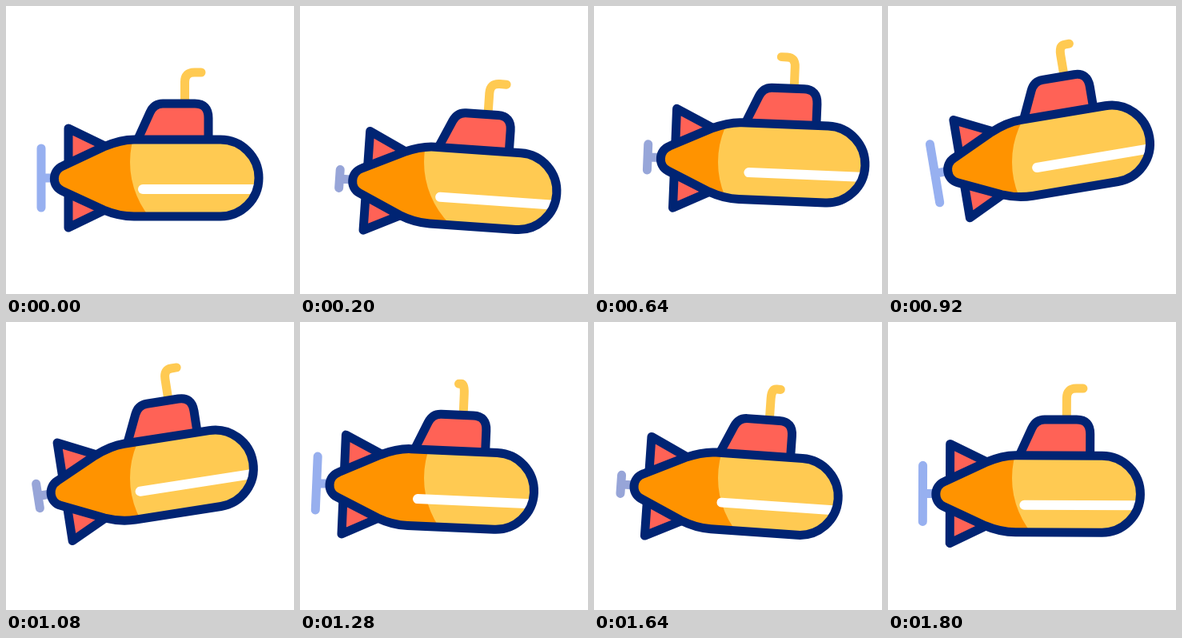
An HTML page with a canvas that plays this animation: 360 by 360 pixels, repeating every 1.84 s.

```html
<!DOCTYPE html>
<html lang="en">
<head>
<meta charset="utf-8">
<title>Submarine</title>
<style>
html, body { margin: 0; width: 100%; height: 100%; overflow: hidden; background: #fff; }
canvas { display: block; width: 360px; height: 360px; }
</style>
</head>
<body>
<canvas id="stage" width="360" height="360"></canvas>
<script>
const LOOP = 1840, SPIN = LOOP / 2;
const NAVY = '#002473', RED = '#ff6256', YELLOW = '#ffca52', ORANGE = '#ff9300';
const ctx = document.getElementById('stage').getContext('2d');

// Turning points as [ms, value]; the motion eases in and out between them
const driftX = [[0, 0], [660, 23], [740, 23], [1340, -24.7], [1400, -24.7], [LOOP, 0]];
const driftY = [[0, 0], [350, 18], [760, -30], [890, -30], [1300, -7], [LOOP, 0]];
const tilt = [[0, 0], [420, 8.5], [1000, -10.5], [1440, 8], [LOOP, 0]];
const scopeTurn = [[0, 1], [280, 1], [600, -0.85], [750, -0.85], [990, 1],
  [1430, -0.85], [1740, 1], [LOOP, 1]];

function ease(keys, t) {
  const i = keys.findIndex(key => key[0] > t);
  const [t0, v0] = keys[i - 1], [t1, v1] = keys[i];
  const u = (t - t0) / (t1 - t0);
  return v0 + (v1 - v0) * u * u * (3 - 2 * u);
}

const hull = new Path2D('M268 167H160C146 167 134 171 122 176L71 200C57 206 57 225 70 231' +
  'L122 255C134 260 146 263 160 263H268A48 48 0 0 0 268 167Z');
const fins = new Path2D('M78 153L140 183V247L78 277Z');
const tower = new Path2D('M165 166L180 133Q185 122 196 122H236Q253 122 253 140V165');

function line(path, color, width = 11) {
  ctx.strokeStyle = color;
  ctx.lineWidth = width;
  ctx.stroke(path);
}

function shape(path, fill) {
  ctx.fillStyle = fill;
  ctx.fill(path);
  line(path, NAVY);
}

function drawPropeller(t) {
  const angle = t / SPIN * 2 * Math.PI;
  const length = 53 - 9.5 * Math.cos(angle) + 30.5 * Math.cos(2 * angle);
  const light = Math.min(1, Math.max(0, (length - 30) / 40));
  const blue = `rgb(151, ${165 + 11 * light}, ${216 + 24 * light})`;
  line(new Path2D(`M44 ${215 - length / 2}v${length}M44 215H60`), blue);
}

function drawPeriscope(t) {
  const turn = ease(scopeTurn, t), x = 223.5;
  line(new Path2D(`M${x} 118V95Q${x} 83 ${x + 12 * turn} 83H${x + 20.5 * turn}`), YELLOW);
}

function drawHull() {
  ctx.fillStyle = ORANGE;
  ctx.fill(hull);
  ctx.save();
  ctx.clip(hull);
  // The bright area stays put while the hull moves through it
  ctx.save();
  ctx.resetTransform();
  ctx.fillStyle = YELLOW;
  ctx.beginPath();
  ctx.arc(265, 195, 110, 0, 7);
  ctx.fill();
  ctx.restore();
  line(new Path2D('M171 229H330'), '#fff', 12);
  ctx.restore();
  line(hull, NAVY);
}

function draw(t) {
  ctx.resetTransform();
  ctx.fillStyle = '#fff';
  ctx.fillRect(0, 0, 360, 360);
  ctx.lineCap = ctx.lineJoin = 'round';

  ctx.translate(188 + ease(driftX, t), 215 + ease(driftY, t));
  ctx.rotate(ease(tilt, t) * Math.PI / 180);
  ctx.translate(-188, -215);

  drawPropeller(t);
  drawPeriscope(t);
  shape(fins, RED);
  shape(tower, RED);
  drawHull();
}

function tick() {
  draw(performance.now() % LOOP);
  requestAnimationFrame(tick);
}
tick();
</script>
</body>
</html>
```
